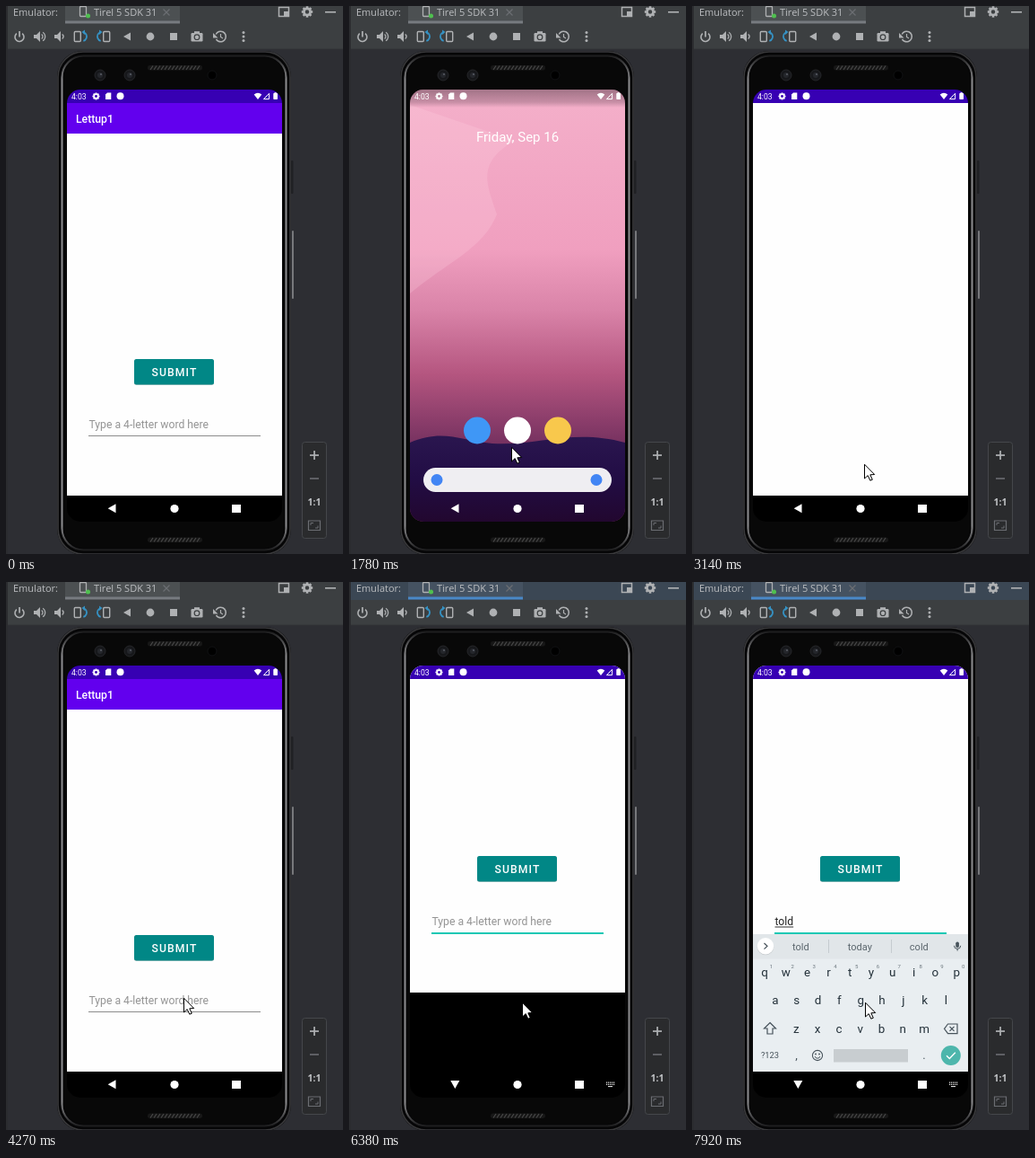
These frames come from a looping animation (376x610 px, 8000 ms). An HTML page with a canvas:

```html
<!DOCTYPE html>
<html lang="en">
<head>
<meta charset="utf-8">
<title>Phone emulator</title>
<style>
html, body { margin: 0; width: 100%; height: 100%; overflow: hidden; background: #2d2e33; }
canvas { display: block; width: 376px; height: 610px; }
</style>
</head>
<body>
<canvas id="stage"></canvas>
<script>
const W = 376, H = 610, LOOP = 8000;
const canvas = document.getElementById('stage');
const c = canvas.getContext('2d');
const dpr = window.devicePixelRatio || 1;
canvas.width = W * dpr;
canvas.height = H * dpr;

const UI = '"Open Sans", sans-serif', DROID = 'Roboto, sans-serif';
const GREY = '#afb1b3', DIM = '#6b6d72', BAR = '#3c3f41', TEAL = '#018786', PURPLE = '#3700b3';

const TICKS = [0, 500, 620, 740, 860, 1500, 1660, 1780, 2030, 2150, 2270,
  2410, 2530, 2650, 2770, 2890, 3140, 3520, 3640, 3760, 3880, 4000, 4140, 4270,
  4640, 4760, 4880, 5260, 5770, 5890, 6010, 6380, 6750, 6900, 7150, 7400, 7520, 7920];

// Pointer path: time, x, y
const PATH = [[500, 78, 422], [740, 53, 436], [1780, 181, 490], [2410, 181, 490],
  [2890, 179, 531], [3140, 192, 509], [3520, 192, 509], [4000, 194, 492],
  [4270, 198, 462], [4640, 197, 463], [4880, 193, 467], [8000, 193, 467]];

function rect(x, y, w, h, fill) {
  c.fillStyle = fill;
  c.fillRect(x, y, w, h);
}
function round(x, y, w, h, r, fill, stroke, lw = 1) {
  c.beginPath();
  c.roundRect(x, y, w, h, r);
  paint(fill, stroke, lw);
}
function disc(x, y, r, fill, stroke, lw = 1) {
  c.beginPath();
  c.arc(x, y, r, 0, 7);
  paint(fill, stroke, lw);
}
function arc(x, y, r, a, b, stroke, lw = 1) {
  c.beginPath();
  c.arc(x, y, r, a, b);
  paint(null, stroke, lw);
}
function poly(pts, fill, stroke, lw = 1, close = true) {
  c.beginPath();
  for (let i = 0; i < pts.length; i += 2) c.lineTo(pts[i], pts[i + 1]);
  if (close) c.closePath();
  paint(fill, stroke, lw);
}
function line(pts, stroke, lw = 1) { poly(pts, null, stroke, lw, false); }
function paint(fill, stroke, lw) {
  if (fill) { c.fillStyle = fill; c.fill(); }
  if (stroke) { c.strokeStyle = stroke; c.lineWidth = lw; c.stroke(); }
}
function text(s, x, y, size, fill, { font = DROID, weight = 400, align = 'left', gap = 0 } = {}) {
  c.font = `${weight} ${size}px ${font}`;
  c.textAlign = align;
  c.letterSpacing = gap + 'px';
  c.fillStyle = fill;
  c.fillText(s, x, y);
  c.letterSpacing = '0px';
}
function shade(y0, y1, stops) {
  const g = c.createLinearGradient(0, y0, 0, y1);
  stops.forEach(([p, col]) => g.addColorStop(p, col));
  return g;
}
function group(draw, alpha = 1, dx = 0, dy = 0) {
  c.save();
  c.globalAlpha *= alpha;
  c.translate(dx, dy);
  draw();
  c.restore();
}
function gear(x, y, r, col) {
  for (let i = 0; i < 8; i++) {
    const a = i * Math.PI / 4;
    line([x + Math.cos(a) * r * .6, y + Math.sin(a) * r * .6, x + Math.cos(a) * r, y + Math.sin(a) * r], col, r * .42);
  }
  disc(x, y, r * .58, null, col, r * .44);
}
function speaker(x, waves) {
  poly([x - 6, 32, x - 3, 32, x + 1, 28, x + 1, 40, x - 3, 36, x - 6, 36], GREY);
  for (let i = 0; i < waves; i++) arc(x + 1, 34, 3 + i * 2.7, -1, 1, GREY, 1.3);
}
function rotateIcon(x, side) {
  round(x - side * 3.2 - 3.5, 28.5, 7, 11, 1, null, GREY, 1.4);
  c.beginPath();
  c.arc(x + side * 2, 34, 5, side > 0 ? -1.2 : Math.PI + 1.2, side > 0 ? 1.3 : Math.PI - 1.3, side < 0);
  paint(null, '#3592c4', 1.8);
  poly([x + side * 1.5, 29, x + side * 5, 26.5, x + side * 5, 32], '#3592c4');
}

function ide(focus) {
  rect(0, 0, W, H, '#2d2e33');
  rect(0, 0, W, 20, focus ? '#3b4754' : BAR);
  rect(66, 0, 128, 17, focus ? '#455261' : '#4c5052');
  rect(66, 16.5, 128, 3, focus ? '#4a88c7' : '#777b80');
  rect(0, 20, W, 28, BAR);
  rect(0, 47.5, W, .8, '#323436');
  rect(0, 0, 2, H, '#2b2c2f');
  text('Emulator:', 8, 11, 11, '#bbbdc0', { font: UI });
  text('Tirel 5 SDK 31', 98, 11, 11, '#bbbdc0', { font: UI });
  round(82.5, .5, 7, 11, 1, null, GREY, 1.3);
  disc(91.5, 11, 2.5, '#4fc04f');
  line([175.5, 3.5, 182.5, 10.5], DIM, 1.2);
  line([182.5, 3.5, 175.5, 10.5], DIM, 1.2);
  round(304.5, 1.5, 11, 10, 0, null, GREY, 1.5);
  rect(310, 6, 5, 5, GREY);
  gear(336, 6.5, 6.2, GREY);
  rect(356, 6, 12, 1.6, GREY);

  arc(15, 34.5, 5, -.9, Math.PI + .9, GREY, 1.6);
  rect(14.2, 28, 1.7, 6.5, GREY);
  speaker(37, 2);
  speaker(60, 1);
  rotateIcon(83, 1);
  rotateIcon(109, -1);
  poly([131, 34, 139, 29.5, 139, 38.5], GREY);
  disc(161, 34, 4.4, GREY);
  rect(183, 30, 8, 8, GREY);
  round(206.5, 30, 13, 9.5, 1.2, GREY);
  rect(210, 28.2, 6, 3, GREY);
  disc(213, 34.7, 2.8, GREY, BAR, 1.2);
  arc(239.5, 34, 5.8, -2.7, 2.6, GREY, 1.6);
  poly([231, 30, 231, 35.5, 236.5, 35.5], GREY);
  line([239.5, 31, 239.5, 34.5, 242, 36], GREY, 1.2);
  for (let i = 0; i < 3; i++) disc(265, 29.5 + i * 4.5, 1.5, GREY);

  round(330.5, 485.5, 27, 107, 3, '#2a2b2d', '#45474b');
  rect(339, 499.2, 10, 1.7, GREY);
  rect(343.2, 495, 1.7, 10, GREY);
  rect(339, 525.2, 10, 1.6, DIM);
  text('1:1', 344, 556, 10.5, '#c0c2c4', { font: UI, weight: 700, align: 'center' });
  round(337.5, 573, 13, 10.5, 0, null, DIM, 1.2);
  line([340, 578, 340, 575.5, 343, 575.5], DIM);
  line([345, 581, 348, 581, 348, 578.5], DIM);
}

function grille(y) {
  round(158, y, 61, 5.5, 2.7, '#171717');
  for (let x = 161; x < 216; x += 4) line([x, y + 5, x + 3, y + .5], '#4b4b4b', 1.1);
}
function phone() {
  round(318, 172, 2.5, 37, 1, '#202124');
  round(319, 250, 2, 76, 1, '#77787b');
  round(57, 50, 261, 561, 29, '#060607');
  round(58, 51, 259, 559, 28, null, '#3a3a3c', 1.6);
  round(62.5, 55.5, 250, 550, 24, null,
    shade(55, 606, [[0, '#1c1c1d'], [.05, '#8e8e90'], [.95, '#8e8e90'], [1, '#1c1c1d']]), 2);
  round(64.5, 57.5, 246, 546, 22, '#080808');
  [105, 138].forEach(x => {
    disc(x, 77, 6, '#17181b', '#26272a');
    disc(x, 77, 3, '#25272c');
    disc(x + 1, 76, 1.1, '#565a62');
  });
  disc(230, 77, 5, '#000', '#111214');
  grille(66);
  grille(591.5);
}

function statusIcons() {
  const w = '#fff';
  text('4:03', 73, 103.6, 8.6, w);
  gear(100.5, 100.5, 4.1, w);
  poly([111, 98.5, 113, 96.5, 117.3, 96.5, 117.3, 104, 111, 104], w);
  disc(127.5, 100.3, 4, w);
  poly([276.7, 98.5, 278.8, 97.2, 281, 96.8, 283.2, 97.2, 285.3, 98.5, 281, 104], w);
  poly([287.5, 103.6, 293.6, 103.6, 293.6, 97.3], null, w, 1);
  round(298.3, 97, 4.7, 7, .7, w);
  rect(299.5, 96.2, 2.2, 1.2, w);
}
function navIcons(turn, keys) {
  c.save();
  c.translate(118.3, 559.3);
  c.rotate(-turn * Math.PI / 2);
  poly([-4.6, 0, 4.2, -5, 4.2, 5], '#fff');
  c.restore();
  disc(188, 559.5, 4.6, '#fff');
  rect(252, 555, 10, 9, '#fff');
  if (!keys) return;
  for (let i = 0; i < 5; i++) for (let j = 0; j < 2; j++) rect(287 + i * 2, 556.5 + j * 2.2, 1.2, 1.3, '#ddd');
  rect(289, 561, 5, 1.1, '#ddd');
}

function home() {
  rect(68, 93, 240, 481, shade(93, 490, [[0, '#f4b0ca'], [.45, '#f09fbf'], [.62, '#d983a8'], [.8, '#b4557f'], [1, '#74305f']]));
  c.beginPath();
  c.moveTo(68, 110);
  c.lineTo(185, 150);
  c.bezierCurveTo(140, 175, 155, 200, 165, 232);
  c.bezierCurveTo(150, 270, 110, 285, 68, 320);
  paint('rgba(255,215,228,.22)');
  c.beginPath();
  c.moveTo(68, 486);
  c.bezierCurveTo(105, 470, 125, 484, 160, 487);
  c.bezierCurveTo(210, 490, 250, 470, 308, 486);
  c.lineTo(308, 574);
  c.lineTo(68, 574);
  paint(shade(475, 574, [[0, '#2b1750'], [.5, '#220d45'], [1, '#22072f']]));
  rect(68, 93, 240, 20, shade(93, 113, [[0, 'rgba(40,25,35,.4)'], [.7, 'rgba(40,25,35,.22)'], [1, 'rgba(40,25,35,0)']]));
  text('Friday, Sep 16', 188, 151, 15, '#fff', { align: 'center' });
  [[143, '#3f97f6'], [188, '#fff'], [233, '#f8c84c']].forEach(([x, col]) => disc(x, 472.5, 15, col));
  round(83, 514, 210, 27, 13.5, 'rgba(255,255,255,.93)');
  disc(98, 527.5, 6.5, '#4285f4');
  disc(276, 527.5, 6.5, '#4285f4');
}

function opening(scale, alpha) {
  c.save();
  c.globalAlpha = alpha;
  c.translate(188, 333.5);
  c.scale(scale, scale);
  c.translate(-188, -333.5);
  rect(68, 93, 240, 15, PURPLE);
  rect(68, 108, 240, 437, '#fefefe');
  rect(68, 545, 240, 29, '#000');
  c.restore();
}

function app(s) {
  rect(68, 108, 240, 437, '#fefefe');
  rect(68, 108, 240, 34, '#6200ee');
  text('Lettup1', 78, 129.8, 12.2, '#fff', { weight: 500 });
  round(143, 393, 89, 29, 2.5, 'rgba(0,0,0,.2)');
  round(143, 393, 89, 28.4, 2.5, TEAL);
  text('SUBMIT', 162.5, 411.8, 12.2, '#fff', { weight: 500, gap: 1.09 });
  if (s.focus) rect(92, 478, 192, 2, '#1bc8b4');
  else rect(92, 478, 192, 1, '#8c8c8c');
  if (s.typed) {
    text(s.typed, 92.5, 470, 12.2, '#222');
    rect(92.5, 471.5, c.measureText(s.typed).width, 1, '#333');
  } else text('Type a 4-letter word here', 92.5, 470, 12.2, '#949494');
  if (s.caret) {
    c.font = '400 12.2px ' + DROID;
    rect(Math.round(92.3 + c.measureText(s.typed).width), 457, 1.2, 16, TEAL);
  }
}

function keyRow(keys, x, y) {
  [...keys].forEach((k, i) => text(k, x + i * 23.8, y, 13.4, '#24313a', { align: 'center' }));
}
function keyboard(words) {
  const ink = '#47535b', mid = { align: 'center' };
  rect(68, 392, 240, 153, '#e9eef1');
  rect(68, 392, 240, 27.5, '#e1e6e9');
  disc(82, 406, 9.3, 'rgba(0,0,0,.12)');
  disc(82, 405.3, 9.2, '#fff');
  line([80.5, 402, 84, 405.3, 80.5, 408.6], ink, 1.2);
  rect(152, 398, 1, 15, '#c5cbcf');
  rect(222, 398, 1, 15, '#c5cbcf');
  words.forEach((w, i) => text(w, 121.3 + i * 66, 410, 11, '#5b666d', mid));
  round(294.3, 400.5, 3.6, 6.5, 1.8, ink);
  arc(296.1, 404.8, 3.6, 0, Math.PI, ink, 1);
  rect(295.6, 408.2, 1, 2.4, ink);

  keyRow('qwertyuiop', 81, 439);
  [...'1234567890'].forEach((d, i) => text(d, 88.5 + i * 23.8, 430, 6, '#6c777e', mid));
  keyRow('asdfghjkl', 93, 470);
  keyRow('zxcvbnm', 116.3, 501.5);
  poly([87, 490.5, 93.5, 497, 90, 497, 90, 503, 84, 503, 84, 497, 80.5, 497], null, ink, 1.2);
  poly([281.5, 497.3, 285.5, 492, 296, 492, 296, 502.6, 285.5, 502.6], null, ink, 1.2);
  line([287.5, 494.8, 292.5, 499.8], ink, 1.2);
  line([292.5, 494.8, 287.5, 499.8], ink, 1.2);
  text('?123', 87, 530.3, 9.3, ink, mid);
  text(',', 116.5, 530.5, 13, ink, mid);
  text('.', 259, 530.5, 13, ink, mid);
  disc(140, 527, 5.6, null, ink, 1.1);
  disc(138, 525.5, .9, ink);
  disc(142, 525.5, .9, ink);
  arc(140, 527.2, 3, .3, 2.85, ink, 1);
  rect(158, 520, 83, 14.5, '#c8cdd0');
  disc(288.8, 527, 11, '#4db6ac');
  line([284, 527.2, 287.3, 530.5, 293.8, 523.8], '#fff', 1.4);
}

function pointer(t) {
  if (t < 500 || (t >= 860 && t < 1780)) return;
  const i = PATH.findIndex(p => p[0] > t);
  const [t0, x0, y0] = PATH[i - 1], [t1, x1, y1] = PATH[i];
  const k = (t - t0) / (t1 - t0);
  const x = x0 + (x1 - x0) * k, y = y0 + (y1 - y0) * k;
  group(() => {
    c.lineJoin = 'round';
    poly([0, 0, 0, 15.8, 3.7, 12.4, 6.3, 18, 8.8, 17, 6.3, 11.6, 11.2, 11.3], '#fff', '#000', 1);
  }, 1, Math.round(x) + .5, Math.round(y) + 1.2);
}

function screen(t) {
  const s = {
    focus: t >= 4640,
    typed: t >= 7400 ? 'told' : t >= 6900 ? 'tol' : '',
    caret: (t >= 4640 && t < 5260) || (t >= 5770 && t < 6380) || (t >= 6900 && t < 7920)
  };
  const onHome = t >= 1660 && t < 2410;
  const appUp = t < 1500 || t >= 2410;
  c.save();
  c.beginPath();
  c.roundRect(68, 93, 240, 481, 15);
  c.clip();
  rect(68, 93, 240, 481, '#000');
  if (onHome) {
    group(home, t < 1780 ? .5 : 1);
    if (t >= 2270) opening(.983, 1);
    else if (t >= 2150) opening(.925, .81);
    else if (t >= 2030) opening(.87, .35);
  } else if (appUp) {
    if (t >= 2410 && t < 3520) rect(68, 108, 240, 437, '#fefefe');
    else group(() => app(s), 1, 0, t >= 6380 ? -88 : 0);
    rect(68, 93, 240, 15, PURPLE);
    if (t >= 6750) {
      const words = t >= 7520 ? ['told', 'today', 'cold'] : t >= 7150 ? ['tol', 'told', 'toll'] : [];
      group(() => keyboard(words), 1, 0, t < 6900 ? 11 : 0);
    }
  }
  statusIcons();
  navIcons(t >= 6010 ? 1 : t >= 5890 ? .5 : 0, t >= 5890);
  c.restore();
}

function frame(now) {
  const time = now % LOOP;
  const t = TICKS.filter(k => k <= time).pop() || 0;
  c.setTransform(dpr, 0, 0, dpr, 0, 0);
  ide(t >= 4640);
  phone();
  screen(t);
  pointer(t);
}

const start = performance.now();
(function loop() {
  frame(performance.now() - start);
  requestAnimationFrame(loop);
})();
</script>
</body>
</html>
```
